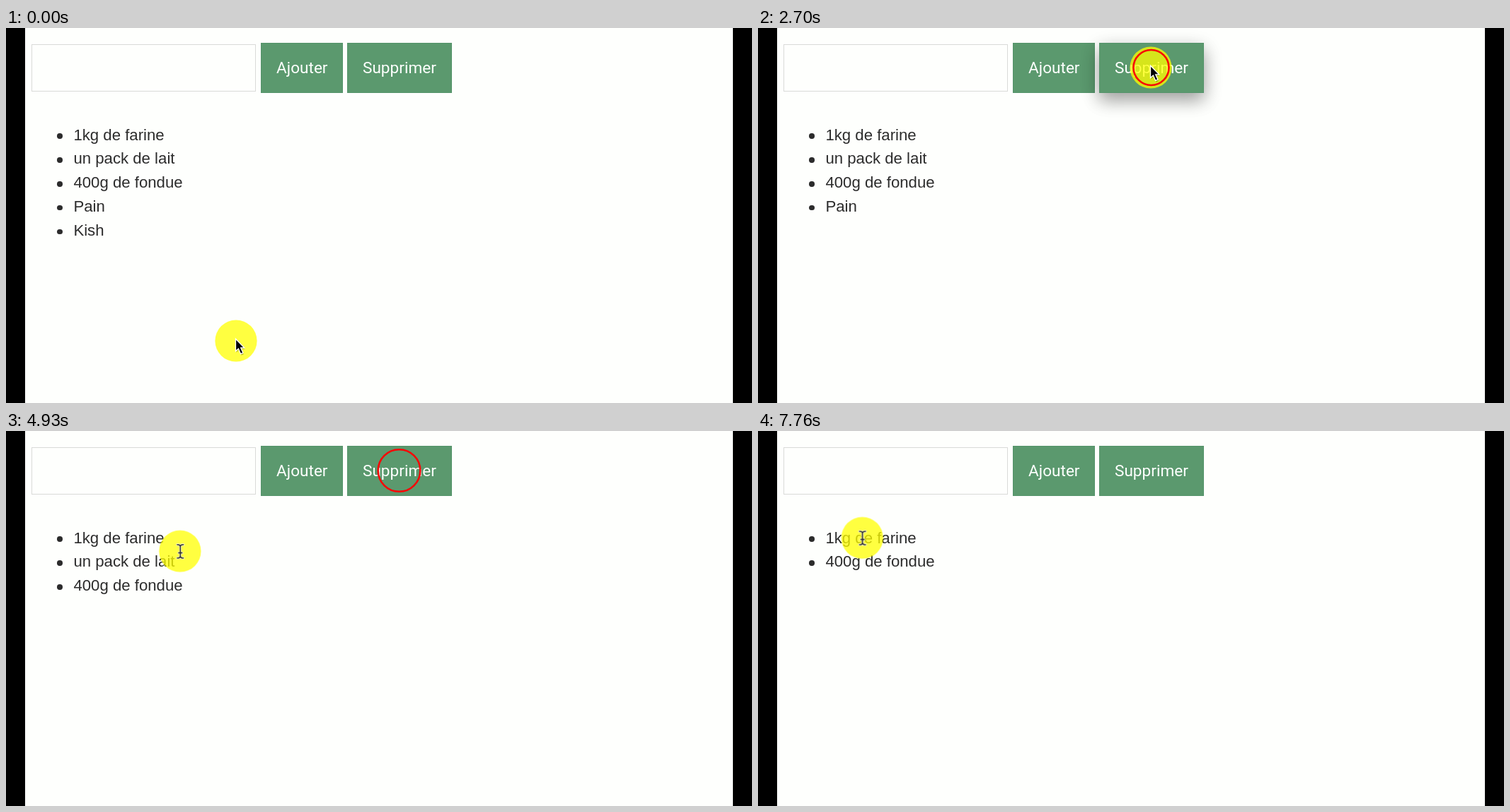
Animation of 1054 by 531 pixels, one loop 8 s. Source, as an HTML page:

```html
<!DOCTYPE html>
<html lang="fr">
<head>
<meta charset="utf-8">
<title>Liste de courses</title>
<style>
  html, body { margin: 0; width: 100%; height: 100%; overflow: hidden; background: #000; }
  #stage { position: relative; width: 1054px; height: 531px; overflow: hidden; background: #000; }
  #stage > * { position: absolute; box-sizing: border-box; }
  #page { left: 27px; top: 0; width: 1000px; height: 531px; background: #fefffd; }

  .field { left: 36px; top: 23px; width: 317px; height: 67px; border: 1px solid #d9dad8; background: #fefffd; }
  .btn {
    top: 21px; height: 71px; padding-left: 22px;
    background: #5b996e; box-shadow: inset 0 0 0 1px #54936a;
    color: #fdfffd; font: 22.6px/71px Roboto, sans-serif; white-space: nowrap;
  }
  .add { left: 360px; width: 116px; }
  .del { left: 482px; width: 148px; animation: hover 8s linear infinite; }

  ul {
    left: 95.4px; top: 134.6px; margin: 0; padding: 0; list-style: none;
    color: #2c2c2c; font: 22.2px/33.9px "Liberation Sans", Arial, sans-serif; white-space: nowrap;
  }
  li { position: relative; height: 33.9px; }
  li::before {
    content: ""; position: absolute; left: -23.1px; top: 14.8px;
    width: 7.4px; height: 7.4px; border-radius: 50%; background: #2c2c2c;
  }
  .milk { animation: drop-milk 8s step-end infinite; }
  .bread { animation: drop-bread 8s step-end infinite; }
  .quiche { animation: drop-quiche 8s step-end infinite; }

  svg { left: 0; top: 0; }
  .pointer { animation: move 8s linear infinite; }
  .arrow { animation: arrow 8s step-end infinite; }
  .beam { animation: beam 8s step-end infinite; }
  .ring { fill: none; stroke: #f80606; stroke-width: 2.6px; opacity: 0; animation: ring 8s linear infinite; }

  @keyframes move {
    0% { transform: translate(325px, 443px); animation-timing-function: cubic-bezier(.333, 0, .667, 1); }
    9.5%, 18.24% { transform: translate(555px, 57px); }
    18.25%, 55.375% { transform: translate(555px, 56px); }
    55.375% { animation-timing-function: cubic-bezier(.333, 0, .667, .613); }
    61.625% { transform: translate(246.5px, 170px); animation-timing-function: cubic-bezier(.333, .578, .667, 1); }
    64.5%, 66.4% { transform: translate(162px, 192px); }
    68.25%, 90% { transform: translate(166px, 186px); }
    90% { animation-timing-function: cubic-bezier(.333, 0, .667, 1); }
    95% { transform: translate(144px, 153px); animation-timing-function: ease-out; }
    97%, 100% { transform: translate(147.3px, 151.3px); }
  }
  @keyframes hover {
    0%, 7%, 58%, 100% {
      box-shadow: inset 0 0 0 1px #54936a, 0 11px 22px rgba(0, 0, 0, 0), 0 8px 28px rgba(0, 0, 0, 0);
    }
    9.25%, 57.2% {
      box-shadow: inset 0 0 0 1px #54936a, 0 11px 22px rgba(0, 0, 0, .24), 0 8px 28px rgba(0, 0, 0, .19);
    }
  }
  @keyframes ring {
    0% { r: 5.7px; opacity: 1; animation-timing-function: cubic-bezier(.333, .5, .667, .9); }
    16% { r: 31.2px; opacity: 1; }
    16.01%, 100% { r: 31.2px; opacity: 0; }
  }
  @keyframes drop-quiche { 25.6%, 100% { opacity: 0; height: 0; } }
  @keyframes drop-bread { 49.4%, 100% { opacity: 0; height: 0; } }
  @keyframes drop-milk { 81%, 100% { opacity: 0; height: 0; } }
  @keyframes arrow { 0% { opacity: 1; } 60.06%, 100% { opacity: 0; } }
  @keyframes beam { 0% { opacity: 0; } 60.06%, 100% { opacity: 1; } }
</style>
</head>
<body>
<div id="stage">
  <div id="page"></div>
  <div class="field"></div>
  <div class="btn add">Ajouter</div>
  <div class="btn del">Supprimer</div>
  <ul>
    <li>1kg de farine</li>
    <li class="milk">un pack de lait</li>
    <li>400g de fondue</li>
    <li class="bread">Pain</li>
    <li class="quiche">Kish</li>
  </ul>
  <svg width="1054" height="531" viewBox="0 0 1054 531">
    <g class="pointer"><circle r="29.6" fill="#ff0" fill-opacity=".75"/></g>
    <circle class="ring" cx="555.5" cy="56" style="animation-delay: 1920ms"/>
    <circle class="ring" cx="555.5" cy="56" style="animation-delay: 3820ms"/>
    <circle class="ring" cx="166" cy="186" style="animation-delay: 6350ms"/>
    <g class="pointer">
      <g class="arrow">
        <path d="M0-2.5V15L3.9 11.4 7.1 18.8 10.4 17.4 7.2 10.2H12.2Z" transform="translate(.5 1.6)" fill="#000" fill-opacity=".25"/>
        <path d="M-.5-2.8V14.6L3.4 11 6.6 18.4 9.9 17 6.7 9.8H11.7Z" fill="#000" stroke="#fff" stroke-width="1.3"/>
      </g>
      <g class="beam" fill="none" stroke-linecap="round">
        <path id="bar" d="M-4-9.2Q0-9.4 .4-6.8Q.8-9.4 4.8-9.2M-4 9.8Q0 10 .4 7.4Q.8 10 4.8 9.8M.4-7.4V8M-2 2.4H2.8" stroke="#fff" stroke-opacity=".75" stroke-width="3.4"/>
        <path d="M-4-9.2Q0-9.4 .4-6.8Q.8-9.4 4.8-9.2M-4 9.8Q0 10 .4 7.4Q.8 10 4.8 9.8M.4-7.4V8M-2 2.4H2.8" stroke="#2a2a2a" stroke-width="1.6"/>
      </g>
    </g>
  </svg>
</div>
</body>
</html>
```
